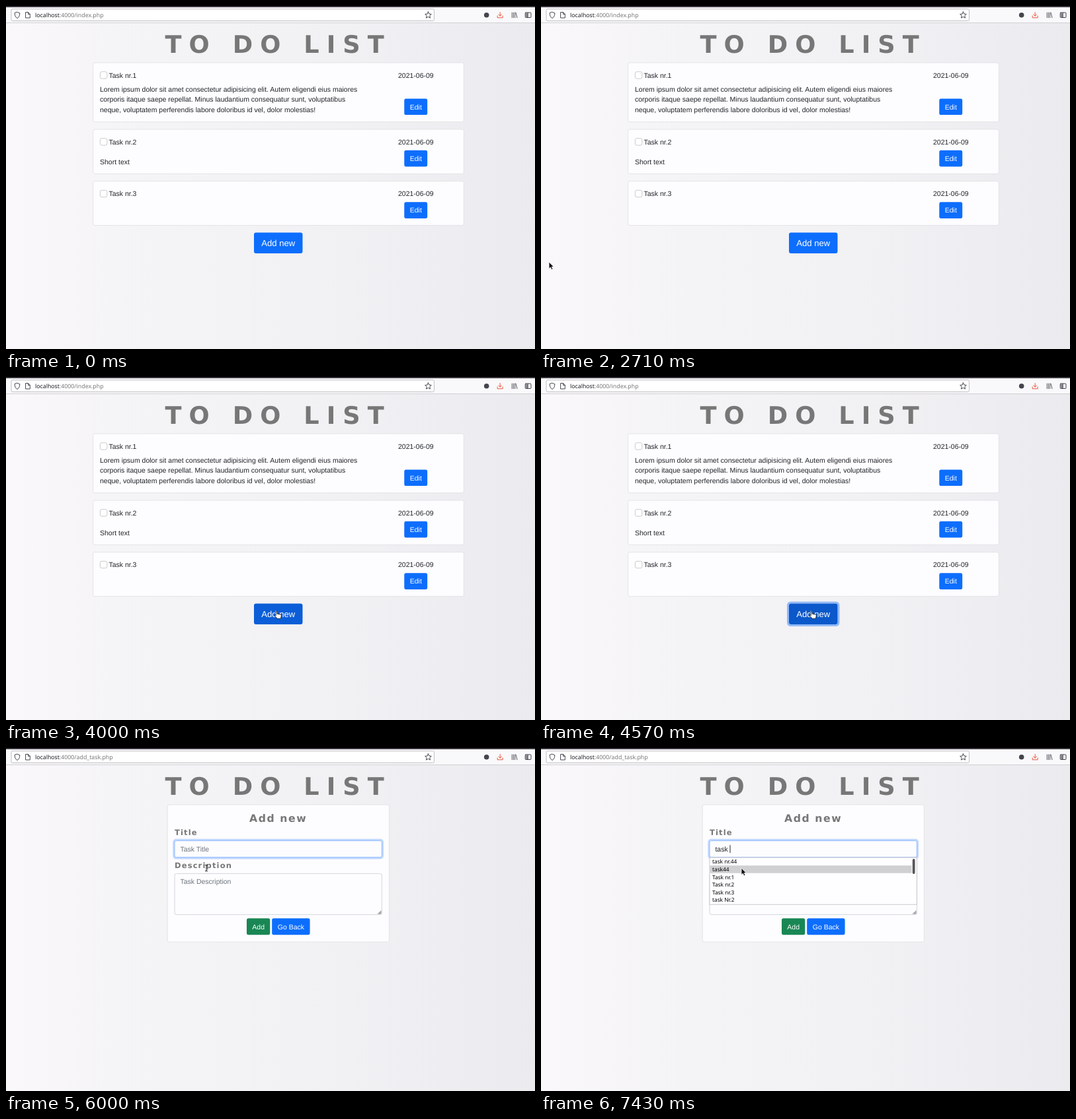
These frames come from a looping animation (800 by 520 pixels, 8 s). An HTML page:

```html
<!DOCTYPE html>
<html lang="en">
<head>
<meta charset="utf-8">
<title>To do list</title>
<style>
  html, body { margin: 0; width: 100%; height: 100%; overflow: hidden; }
  svg { display: block; width: 800px; height: 520px; }
  text { font: 10.5px "Liberation Sans", Arial, sans-serif; fill: #212529; white-space: pre; text-rendering: geometricPrecision; }
  .url text { font: 8.75px "Noto Sans", "Open Sans", sans-serif; fill: #777; }
  .url .host { fill: #1c1b22; }
  .title, .sub, .label { font-family: "DejaVu Sans", sans-serif; font-weight: bold; fill: #777; }
  .title { font-size: 36.7px; letter-spacing: 11.05px; }
  .sub { font-size: 15.7px; letter-spacing: 1.57px; }
  .label { font-size: 11.5px; letter-spacing: 1.15px; }
  .hint { fill: #6c757d; }
  .btn { fill: #fff; text-anchor: middle; }
  .big { font-size: 13.1px; }
  .card { fill: #fdfcfe; stroke: #dfdfe2; stroke-width: .8; }
  .field { fill: #fdfcfe; stroke: #ced4da; stroke-width: .9; }
  .check { fill: #fff; stroke: #bfbfbf; stroke-width: .8; }
  .icon { fill: none; stroke: #45444d; stroke-width: 1; stroke-linejoin: round; stroke-linecap: round; }
  #popup text { font: 8.3px "Noto Sans", "Open Sans", sans-serif; fill: #000; }
</style>
</head>
<body>
<svg viewBox="0 0 800 520">
  <defs>
    <linearGradient id="bg">
      <stop offset="0" stop-color="#faf8fa"/>
      <stop offset=".2" stop-color="#f5f4f6"/>
      <stop offset=".65" stop-color="#f1f0f3"/>
      <stop offset="1" stop-color="#ebebef"/>
    </linearGradient>
  </defs>
  <rect width="800" height="520" fill="url(#bg)"/>

  <!-- browser toolbar -->
  <rect width="800" height="26" fill="#f9f8fa"/>
  <rect width="800" height="1.8" fill="#2d2a32"/>
  <path d="M0 25.5H800" stroke="#d0d0d3"/>
  <rect x="8" y="4.5" width="639.5" height="18" rx="2" fill="#fff" stroke="#b9b9bd" stroke-width=".9"/>
  <g class="icon">
    <path d="M17 9.3L20.8 10.7C20.8 14.5 19.8 17 17 18.5C14.2 17 13.2 14.5 13.2 10.7Z"/>
    <path d="M30 9.5H33.7L36.3 12.2V18H30ZM33.5 9.7V12.4H36"/>
    <path d="M638.5 8.8L640 12L643.3 12.4L640.8 14.7L641.5 18.1L638.5 16.4L635.5 18.1L636.2 14.7L633.7 12.4L637 12Z"/>
    <path d="M743.2 15V17.8H751.2V15M747.2 9.5V15M744.8 12.8L747.2 15.2L749.6 12.8" stroke="#e8573f"/>
    <path d="M765.3 10V17.7M767.5 10V17.7M769.7 10V17.7M771 10L773 17.7" stroke-width=".9"/>
    <rect x="785.2" y="10" width="8.8" height="7.5" rx="1"/>
    <path d="M786 11H789V17H786Z" fill="#8b8a90" stroke="none"/>
    <path d="M789.2 10V17.5"/>
  </g>
  <circle cx="726.7" cy="13.7" r="3.8" fill="#45444d"/>
  <g class="url"><text x="44" y="16.8"><tspan class="host">localhost</tspan>:4000/<tspan id="file"></tspan></text></g>

  <text class="title" x="240.5" y="71">TO DO LIST</text>

  <g id="list">
    <g id="tasks"></g>
    <text x="142" y="129.6">Lorem ipsum dolor sit amet consectetur adipisicing elit. Autem eligendi eius maiores</text>
    <text x="142" y="145.3">corporis itaque saepe repellat. Minus laudantium consequatur sunt, voluptatibus</text>
    <text x="142" y="161">neque, voluptatem perferendis labore doloribus id vel, dolor molestias!</text>
    <text x="142" y="239.8">Short text</text>
    <rect id="addRing" x="373.5" y="342" width="76.5" height="34.5" rx="4" fill="none" stroke="#3184fd" stroke-opacity=".5" stroke-width="3"/>
    <rect id="addNew" x="375" y="343.5" width="73.5" height="31.5" rx="3"/>
    <text class="btn big" x="411.8" y="363.8">Add new</text>
  </g>

  <g id="form">
    <rect class="card" x="244.2" y="86" width="335.2" height="208" rx="2.6"/>
    <text class="sub" x="368" y="112">Add new</text>
    <text class="label" x="255" y="132">Title</text>
    <rect id="glow" x="253.7" y="139.2" width="316" height="27.8" rx="3.5" fill="none" stroke="#0d6efd" stroke-opacity=".25" stroke-width="2.8"/>
    <rect id="input" class="field" x="255" y="140.6" width="313.4" height="25" rx="2.6"/>
    <text id="typed" x="263.4" y="156.8"></text>
    <path id="caret" d="M0 147.2V159" stroke="#111" stroke-width=".9"/>
    <text class="label" x="255" y="181.7">Description</text>
    <rect class="field" x="255" y="190.4" width="313.4" height="62.2" rx="2.6"/>
    <text class="hint" x="263.4" y="206">Task Description</text>
    <path d="M567.5 246V251.7H561.5Z" fill="#a5a5a8"/>
    <rect x="364" y="258.2" width="35.3" height="25" rx="2.6" fill="#198754"/>
    <text class="btn" x="381.7" y="274.6">Add</text>
    <rect x="402.2" y="258.2" width="57.4" height="25" rx="2.6" fill="#0d6efd"/>
    <text class="btn" x="430.9" y="274.6">Go Back</text>
    <g id="popup">
      <rect x="255" y="166" width="313.4" height="71.2" fill="#fefdff" stroke="#bcbcc0" stroke-width=".8"/>
      <rect x="255.5" y="178.2" width="305" height="11.5" fill="#d0cfd1"/>
      <rect x="561.8" y="168" width="3.8" height="23" rx="1.9" fill="#57565a"/>
    </g>
  </g>

  <g id="cursor" stroke-linejoin="round">
    <path id="arrow" d="M0 0V10.3L2.4 8.2L4 11.7L5.9 10.8L4.3 7.5H7.3Z" fill="#111" stroke="#fff" stroke-width=".8"/>
    <path id="hand" d="M-1.2 1C-1.2 -.4 .6 -.4 .6 1V4L5.6 5C6.8 5.3 7 6 6.8 7L6 11.2H.6L-2.6 7.2C-3 6.2 -2 5.7 -1.2 6.5Z" fill="#fff" stroke="#222" stroke-width=".9"/>
    <path id="beam" d="M-2 -4.5H2M0 -4.5V4.5M-2 4.5H2" fill="none" stroke="#333" stroke-width="1.1"/>
  </g>
</svg>
<script>
const $ = id => document.getElementById(id);
const show = (id, on) => $(id).style.display = on ? '' : 'none';

// task cards: top, height, button top
[[86, 89.7, 140.5], [187, 67.4, 218.8], [265.6, 67, 297.3]].forEach(([y, h, b], i) => {
  $('tasks').innerHTML += `
    <rect class="card" x="131.6" y="${y}" width="560.8" height="${h}" rx="2.6"/>
    <rect class="check" x="142.4" y="${y + 13.7}" width="10.4" height="10.4" rx="2.4"/>
    <text x="155.4" y="${y + 22.5}">Task nr.${i + 1}</text>
    <text x="593" y="${y + 22.5}">2021-06-09</text>
    <rect x="602.3" y="${b}" width="34.9" height="24.6" rx="2.6" fill="#0d6efd"/>
    <text class="btn" x="619.8" y="${b + 16}">Edit</text>`;
});

['task nr.44', 'task44', 'Task nr.1', 'Task nr.2', 'Task nr.3', 'task Nr.2'].forEach((s, i) =>
  $('popup').innerHTML += `<text x="259" y="${175.2 + i * 11.65}">${s}</text>`);

const FPS = 7, TICKS = 56;
const OPEN = 33, POPUP = 48;
// pointer keys: tick, x, y
const path = [[19, 12, 388], [21, 135, 386], [24, 378, 360], [26, 409.5, 355], [34, 409.5, 355], [39, 303, 182]];
const typing = [46, 47, 49, 51, 52];

function pointer(n) {
  const i = path.findIndex(k => k[0] > n);
  if (i < 0) return path.at(-1).slice(1);
  const [a, ax, ay] = path[i - 1], [b, bx, by] = path[i];
  const p = (n - a) / (b - a);
  return [ax + (bx - ax) * p, ay + (by - ay) * p];
}

function draw(n) {
  const form = n >= OPEN;
  show('list', !form);
  show('form', form);
  $('file').textContent = form ? 'add_task.php' : 'index.php';

  const pressed = n >= 29;
  show('addRing', pressed);
  $('addNew').setAttribute('fill', pressed ? '#0a58ca' : n >= 25 ? '#0b5ed7' : '#0d6efd');

  const focus = n > OPEN;
  show('glow', focus);
  $('input').style.stroke = focus ? '#86b7fe' : '';
  const count = typing.filter(k => k <= n).length;
  $('typed').textContent = count ? 'task '.slice(0, count) : 'Task Title';
  $('typed').setAttribute('class', count ? '' : 'hint');
  show('popup', n >= POPUP);
  show('caret', count || n < 37 || n === 41);
  const advance = [0, 2.9, 8.8, 14, 19.3, 22.2][count];
  $('caret').setAttribute('transform', `translate(${263.8 + advance})`);

  show('cursor', n >= path[0][0]);
  if (n < path[0][0]) return;
  const [x, y] = pointer(n);
  $('cursor').setAttribute('transform', `translate(${x} ${y})`);
  const hand = n >= 25 && !form, beam = form && y < 252 && n < POPUP;
  show('hand', hand);
  show('beam', beam);
  show('arrow', !hand && !beam);
}

const start = performance.now();
function frame() {
  const t = performance.now() - start;
  // small lead, as the ticks fall on times rounded down to 10 ms
  draw(Math.floor((t + 10) * FPS / 1000) % TICKS);
  requestAnimationFrame(frame);
}
frame();
</script>
</body>
</html>
```
